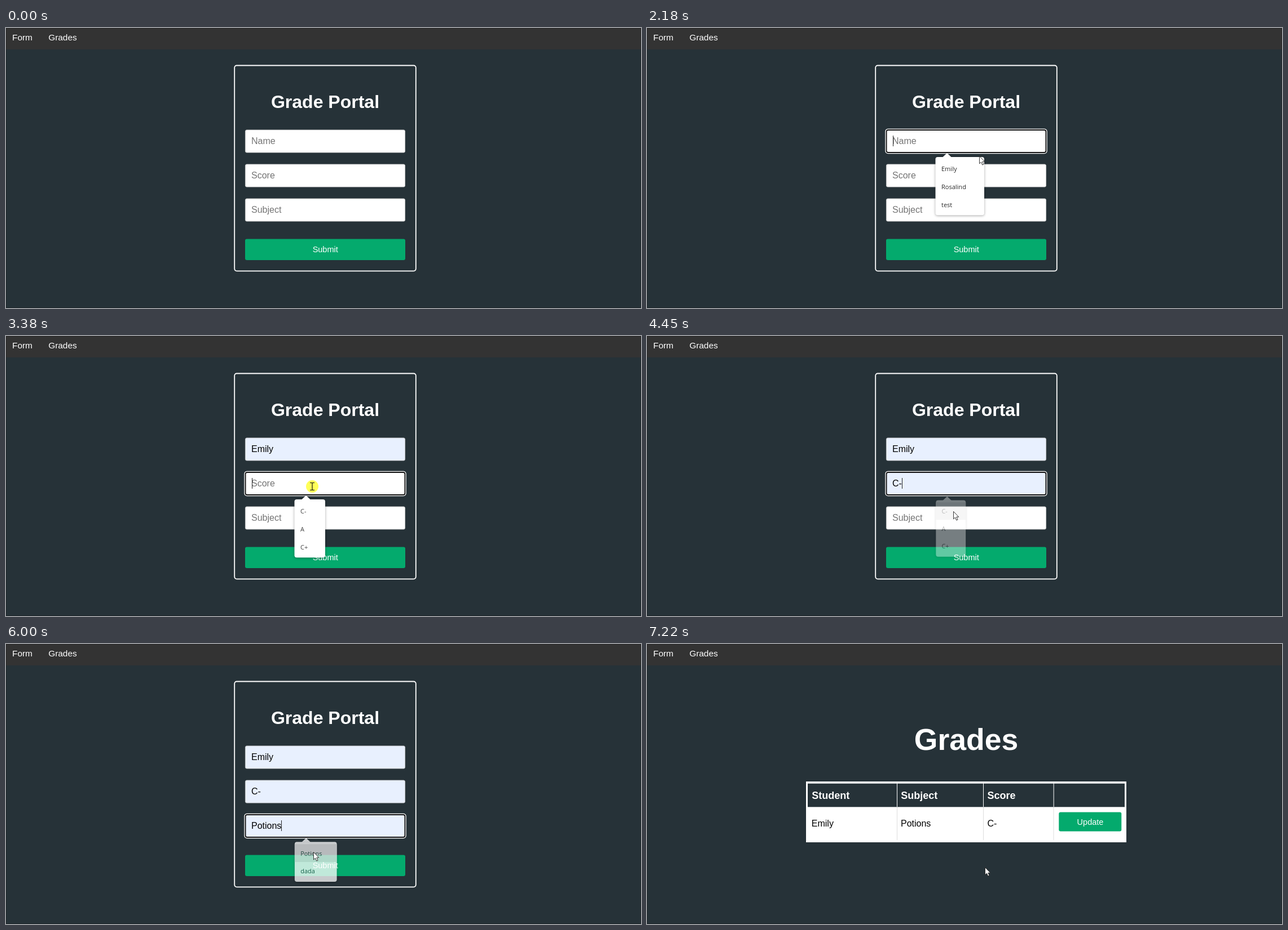
An HTML page that plays this animation: 1126 by 497 pixels, repeating every 8000 ms.

```html
<!DOCTYPE html>
<html lang="en">
<head>
<meta charset="utf-8">
<title>Grade Portal</title>
<style>
  html, body { margin: 0; width: 100%; height: 100%; overflow: hidden; background: #263238; }
  svg { display: block; width: 100%; height: 100%; }
  text { font: 16px "Liberation Sans", Arial, sans-serif; }
  .nav { font-size: 15.4px; fill: #fff; }
  .title { font-weight: bold; font-size: 32px; fill: #fff; text-anchor: middle; }
  .big { font-size: 53.5px; }
  .head { font-weight: bold; font-size: 18px; fill: #fff; }
  .btn { font-size: 14.5px; fill: #fff; text-anchor: middle; }
  .item { font: 11px "Open Sans", "Noto Sans", sans-serif; }
  .list { transform-box: fill-box; transform-origin: center; filter: drop-shadow(0 1px 2px rgba(0,0,0,.35)); }
</style>
</head>
<body>
<svg id="stage" viewBox="0 0 1126 497">
  <rect width="1126" height="497" fill="#263238"/>
  <rect width="1126" height="38" fill="#333"/>
  <rect x=".5" y=".5" width="1125" height="496" fill="none" stroke="#000" stroke-opacity=".3"/>
  <text class="nav" x="11" y="22">Form</text>
  <text class="nav" x="75.2" y="22">Grades</text>

  <g id="form">
    <rect x="405.2" y="66.5" width="321.6" height="364.8" rx="4" fill="none" stroke="#fff" stroke-width="1.8"/>
    <text class="title" x="566" y="141.5">Grade Portal</text>
    <g id="fields"></g>
    <rect x="424" y="374.5" width="284" height="37.5" rx="3" fill="#04aa6d"/>
    <text class="btn" x="566.2" y="398">Submit</text>
    <g id="lists"></g>
  </g>

  <g id="grades">
    <text class="title big" x="566" y="188">Grades</text>
    <rect x="282" y="244" width="568" height="108" fill="#fff"/>
    <rect x="285" y="247.7" width="562" height="41.6" fill="#263238"/>
    <path d="M443.5 247V289M596.5 247V289M721.2 247V289" stroke="#fff"/>
    <path d="M443.5 290V348M596.5 290V348M721 290V348" stroke="#ddd"/>
    <text class="head" x="292.2" y="274.5">Student</text>
    <text class="head" x="450.3" y="274.5">Subject</text>
    <text class="head" x="603.5" y="274.5">Score</text>
    <text x="291.8" y="324">Emily</text>
    <text x="450" y="324">Potions</text>
    <text x="603.5" y="324">C-</text>
    <rect x="730.3" y="298.5" width="111" height="34" rx="3" fill="#04aa6d"/>
    <text class="btn" x="786" y="321">Update</text>
  </g>

  <circle id="tap" r="11" fill="#ff0" fill-opacity=".65"/>
  <g id="cursor">
    <path id="arrow" d="M.5.5V13.8L3.5 11 5.7 16 8 15 5.8 10.2H9.8Z" fill="#fff" stroke="#222" stroke-width=".9" stroke-linejoin="round"/>
    <path id="beam" d="M-4-6.5H-1Q0-6.5 0-5.5 0-6.5 1-6.5H4M-4 6.5H-1Q0 6.5 0 5.5 0 6.5 1 6.5H4M0-6V6" fill="none" stroke="#111" stroke-width="1.2"/>
  </g>
</svg>
<script>
const LOOP = 8000, BLINK = 535, FADE = 140;
const PRESS = 6540, PAGE = 7090;
const LEFT = 511.5, TEXT_X = 435;
const $ = id => document.getElementById(id);

const fields = [
  { label: 'Name', value: 'Emily', y: 201, on: 1110, open: 1180, fill: 2850, off: 3320,
    width: 86.5, ink: '#2b2b2b', items: ['Emily', 'Rosalind', 'test'] },
  { label: 'Score', value: 'C-', y: 262, on: 3320, open: 3380, fill: 4380, off: 5130,
    width: 54.5, ink: '#444', items: ['C-', 'A', 'C+'] },
  { label: 'Subject', value: 'Potions', y: 323, on: 5130, open: 5210, fill: 5960, off: PAGE,
    width: 75.5, ink: '#1d4a40', items: ['Potions', 'dada'] }
];

const ease = {
  in: u => u * u,
  out: u => 1 - (1 - u) * (1 - u),
  both: u => u * u * (3 - 2 * u)
};

// start, step length, steps, end x, end y, easing
const START = [1196, 557];
const moves = [
  [360, 76, 9, 647.5, 190, 'out'],
  [1990, 63, 4, 589, 227, 'in'],
  [2250, 65, 3, 556, 272, 'out'],
  [2500, 70, 2, 546, 256, 'both'],
  [3000, 60, 4, 543, 267, 'both'],
  [3650, 65, 5, 543, 311, 'both'],
  [4590, 73, 4, 540, 324, 'both'],
  [5610, 70, 3, 545, 369, 'both'],
  [6130, 70, 4, 574, 373, 'in'],
  [6410, 60, 2, 599, 396, 'out']
];
const taps = [[1110, 1180], [2710, 2850], [3320, 3450], [4240, 4380], [5130, 5210], [PRESS, 6630]];

function make(parent, tag, attrs, text) {
  const el = document.createElementNS('http://www.w3.org/2000/svg', tag);
  set(el, attrs);
  if (text) el.textContent = text;
  return parent.appendChild(el);
}
function set(el, attrs) {
  for (const k in attrs) el.setAttribute(k, attrs[k]);
}
function show(el, on) {
  el.style.display = on ? '' : 'none';
}
function box(parent, y, halfW, halfH, rx, fill) {
  return make(parent, 'rect', { x: 566 - halfW, y: y - halfH, width: 2 * halfW, height: 2 * halfH, rx, fill });
}

for (const f of fields) {
  f.top = f.y + 28;
  f.plain = box($('fields'), f.y, 141.6, 20.1, 2.5, '#fff');
  set(f.plain, { stroke: '#ccc', 'stroke-width': .8 });
  f.ring = make($('fields'), 'g', {});
  box(f.ring, f.y, 143.7, 22.2, 5, '#fff');
  box(f.ring, f.y, 142.4, 20.9, 4, '#101010');
  f.inner = box(f.ring, f.y, 140.5, 19, 2, '#fff');
  f.text = make($('fields'), 'text', { x: TEXT_X, y: f.y + 5 });
  f.caret = make($('fields'), 'rect', { y: f.y - 10, width: 1, height: 19, fill: '#222' });

  const h = f.items.length * 32 + 7.3;
  f.list = make($('lists'), 'g', { class: 'list' });
  make(f.list, 'path', { d: `M524 ${f.top + .5}L532 ${f.top - 7}L540 ${f.top + .5}Z`, fill: '#fff' });
  make(f.list, 'rect', { x: LEFT, y: f.top, width: f.width, height: h, rx: 4, fill: '#fff' });
  f.mark = make(f.list, 'rect', { x: LEFT, width: f.width, height: 32, fill: '#e8e8e8' });
  f.items.forEach((s, i) =>
    make(f.list, 'text', { class: 'item', x: 522, y: f.top + 24.5 + 32 * i, fill: f.ink }, s));
}

function pointer(t) {
  let [x, y] = START;
  for (const [t0, dt, n, x1, y1, kind] of moves) {
    if (t < t0) break;
    const k = Math.min(n, Math.floor((t - t0) / dt) + 1);
    const p = ease[kind](k / n);
    x += (x1 - x) * p;
    y += (y1 - y) * p;
  }
  return [x, y];
}

function drawField(f, t, x, y) {
  const focus = t >= f.on && t < f.off;
  const filled = t >= f.fill;
  const listed = t >= f.open && t < f.fill + FADE;
  let hover = -1;
  if (listed && x >= LEFT && x <= LEFT + f.width) {
    const i = Math.floor((y - f.top - 4) / 32);
    if (i >= 0 && i < f.items.length) hover = i;
  }
  const preview = !filled && hover >= 0;
  const tint = filled || preview ? '#e8f0fe' : '#fff';
  set(f.plain, { fill: tint });
  set(f.inner, { fill: tint });
  show(f.ring, focus);

  f.text.textContent = filled ? f.value : preview ? f.items[hover] : f.label;
  f.text.style.fill = filled || preview ? '#000' : '#757575';
  f.text.style.fontSize = preview ? '13.3px' : '16px';

  const lit = Math.floor((t - (filled ? f.fill : f.on)) / BLINK) % 2 === 0;
  show(f.caret, focus && lit && t < PRESS);
  const end = filled ? Math.round(TEXT_X + f.text.getComputedTextLength()) : 436;
  set(f.caret, { x: end });

  show(f.list, listed);
  show(f.mark, hover >= 0);
  set(f.mark, { y: f.top + 4 + 32 * Math.max(0, hover) });
  const [alpha, scale] = !filled ? [1, 1] : t < f.fill + FADE / 2 ? [.75, .99] : [.37, .97];
  f.list.style.opacity = alpha;
  f.list.style.transform = `scale(${scale})`;
  return listed && hover >= 0;
}

function draw(t) {
  const [x, y] = pointer(t);
  const onForm = t < PAGE;
  show($('form'), onForm);
  show($('grades'), !onForm);

  let overList = false, overField = false;
  if (onForm) {
    for (const f of fields) {
      if (drawField(f, t, x, y)) overList = true;
      if (Math.abs(x - 566) < 142 && Math.abs(y - f.y) < 20.5) overField = true;
    }
  }
  const beam = overField && !overList;
  show($('beam'), beam);
  show($('arrow'), !beam);
  set($('cursor'), { transform: `translate(${x} ${y})` });
  set($('tap'), { cx: x, cy: y });
  show($('tap'), taps.some(([a, b]) => t >= a && t < b));
}

function tick() {
  draw(performance.now() % LOOP);
  requestAnimationFrame(tick);
}
tick();
</script>
</body>
</html>
```
